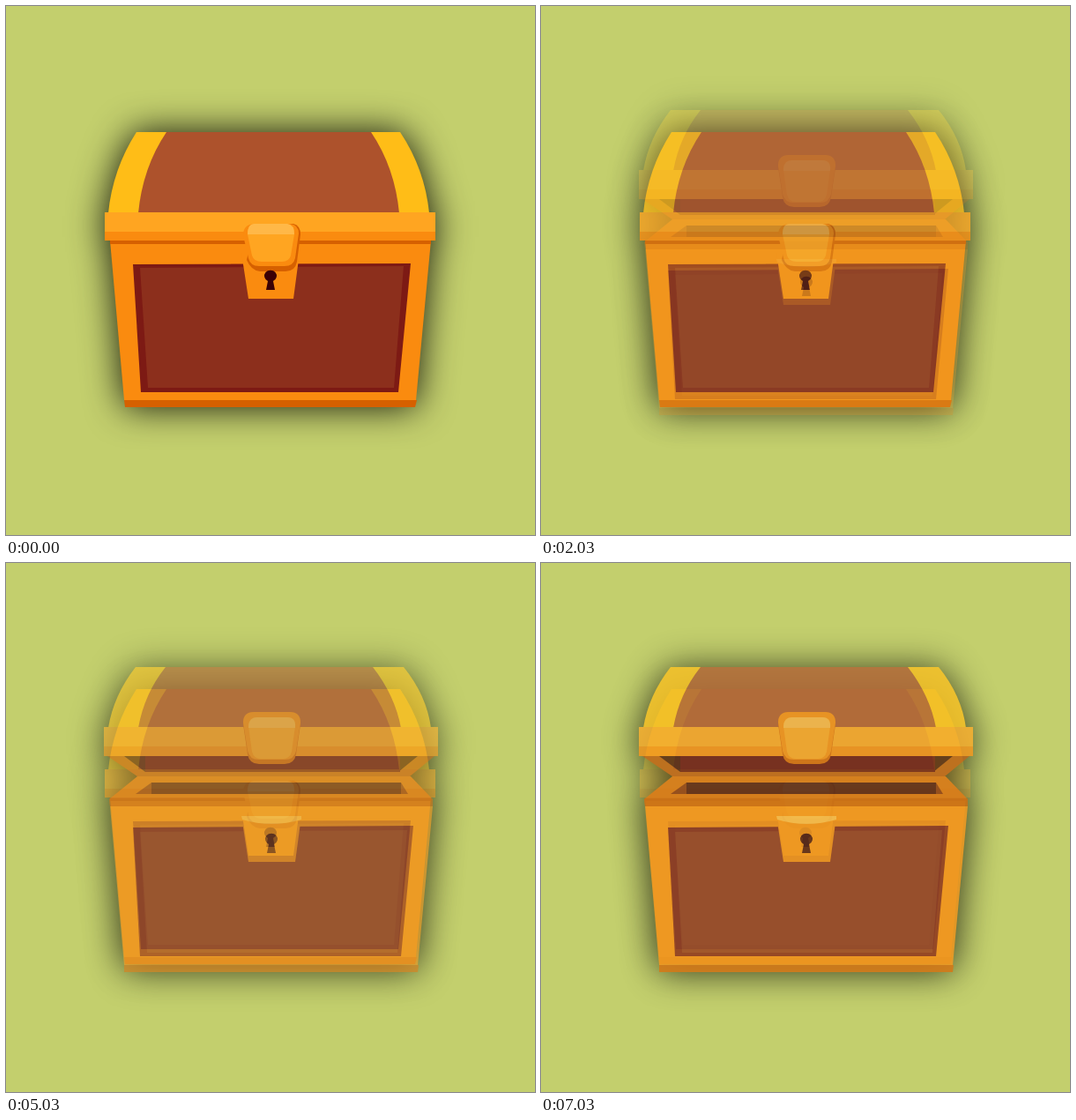
An HTML page for the animation above (8000 ms loop, 600 px wide and 600 px high).

```html
<!DOCTYPE html>
<html lang="en">
<head>
<meta charset="utf-8">
<title>Treasure chest</title>
<style>
  html, body { margin: 0; width: 100%; height: 100%; overflow: hidden; background: #c3cf6d; }
  svg { display: block; width: 100%; height: 100%; }
  .brown { fill: #ad522c; }
  .gold { fill: #ffbd17; }
  .light { fill: #ffa521; }
  .orange { fill: #fa8b0f; }
  .rust { fill: #d66000; }
  .frame { fill: #7d1a14; }
  .panel { fill: #8c2f1c; }
  .shine { fill: #ffb848; }
  .hole { fill: #3b0006; }
</style>
</head>
<body>
<svg viewBox="0 0 600 600">
  <defs>
    <filter id="shadow" filterUnits="userSpaceOnUse" x="0" y="0" width="600" height="600" color-interpolation-filters="sRGB">
      <feDropShadow dx="0" dy="0" stdDeviation="20" flood-color="#000" flood-opacity=".9"/>
    </filter>
    <path id="keyhole" class="hole" d="M-3 3A7 6.5 0 1 1 3 3L5 13H-5Z"/>
  </defs>

  <g id="closed"><g filter="url(#shadow)">
    <!-- lid -->
    <path class="gold" d="M148 143H447Q475 185 480 235H116Q121 185 148 143Z"/>
    <path class="brown" d="M182 143H414Q441 183 446 235H150Q155 183 182 143Z"/>
    <!-- body -->
    <path class="orange" d="M118 266H482L465 447H134Z"/>
    <path class="rust" d="M118 266H482V270H118ZM134 447H466L464 455H135Z"/>
    <path class="frame" d="M144 293L459 292L445 438H153Z"/>
    <path class="panel" d="M152 297L451 295L440 433H161Z"/>
    <!-- band -->
    <path class="light" d="M112 234H487V256H112Z"/>
    <path class="orange" d="M112 256H487V266H112Z"/>
    <!-- lock -->
    <path class="orange" d="M267 280H272L276 287H332L326 332H275Z"/>
    <path class="rust" d="M282 247H326Q334 249 334 259L330 290Q328 301 317 301H288Q278 300 273 288Z"/>
    <path class="orange" d="M281 247H322Q332 248 332 258L328 286Q326 295 316 295H287Q277 295 275 286L269 260Q269 248 281 247Z"/>
    <path class="light" d="M282 247H319Q328 248 327 259L323 283Q321 290 313 290H290Q281 290 279 283L274 259Q274 247 282 247Z"/>
    <path class="shine" d="M282 247H319Q327 248 327 259H274Q274 247 282 247Z"/>
    <use href="#keyhole" x="300" y="309"/>
  </g></g>

  <g id="open"><g filter="url(#shadow)">
    <!-- lid -->
    <path class="gold" d="M147 118H451Q477 150 482 187H116Q122 150 147 118Z"/>
    <path class="brown" d="M181 118H416Q441 150 448 187H150Q157 148 181 118Z"/>
    <!-- underside of the lid -->
    <path fill="#b44d0a" d="M115 219H486L458 242H149Z"/>
    <path fill="#380505" d="M134 219H467L445 237H158Z"/>
    <path fill="#5a0008" d="M158 219H447V237H158Z"/>
    <path class="light" d="M111 186H490V208H111Z"/>
    <path class="orange" d="M111 208H490V219H111Z"/>
    <!-- opening -->
    <path fill="#d66507" d="M149 242H459L484 268V276H118L117 268Z"/>
    <path fill="#7d2408" d="M165 249H448L456 262H147Z"/>
    <path class="hole" d="M165 249H448V262H165Z"/>
    <path fill="#cb5800" d="M117 267H484V276H118Z"/>
    <!-- body -->
    <path class="orange" d="M118 276H484L467 456H134Z"/>
    <path class="rust" d="M134 456H468L467 464H134Z"/>
    <path class="frame" d="M144 300L462 298L448 446H152Z"/>
    <path class="panel" d="M152 305L455 303L444 442H160Z"/>
    <!-- lock -->
    <path class="orange" d="M267 287H335L328 339H275Z"/>
    <path class="shine" d="M267 287H335V291Q301 301 268 291Z"/>
    <use href="#keyhole" x="301" y="316"/>
    <path class="rust" d="M281 169H322Q334 169 334 183L329 217Q327 228 316 228H287Q276 228 274 217L269 183Q269 169 281 169Z"/>
    <path class="orange" d="M281 169H322Q334 169 334 181L329 213Q327 223 316 223H287Q276 223 274 213L269 181Q269 169 281 169Z"/>
    <path class="light" d="M285 175H319Q329 175 328 185L324 214Q322 222 314 222H289Q281 222 279 214L275 185Q275 175 285 175Z"/>
    <path class="shine" d="M285 175H319Q329 175 328 187H275Q275 175 285 175Z"/>
  </g></g>
</svg>
<script>
  const closed = document.getElementById("closed");
  const open = document.getElementById("open");
  const LOOP = 8000, STEP = 1000, DELAY = 30;

  // The crossfade advances by a tenth every second.
  function draw() {
    const time = performance.now() % LOOP;
    const mix = Math.max(0, Math.floor((time - DELAY) / STEP)) / 10;
    closed.setAttribute("opacity", 1 - mix);
    open.setAttribute("opacity", mix);
    requestAnimationFrame(draw);
  }
  draw();
</script>
</body>
</html>
```
